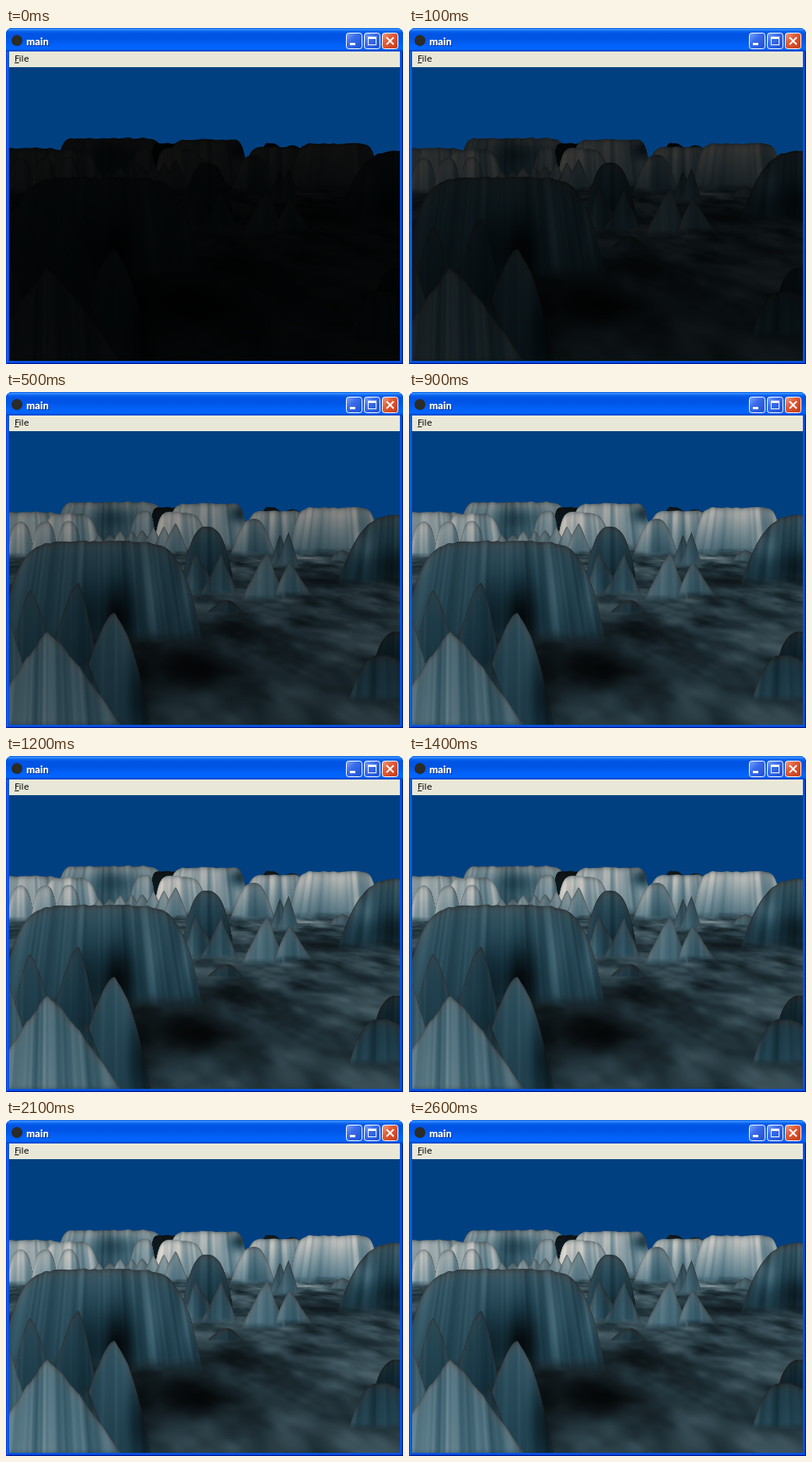
An HTML page with a canvas that plays this animation: 508 by 429 pixels, repeating every 3.6 s.

```html
<!DOCTYPE html>
<html lang="en">
<head>
<meta charset="utf-8">
<title>main</title>
<style>
html, body { margin: 0; width: 100%; height: 100%; overflow: hidden; background: #fff; }
.window { position: absolute; left: 0; top: 0; width: 508px; height: 429px; overflow: hidden;
  border-radius: 8px 8px 0 0; background: #0855dd;
  box-shadow: inset 1px 0 #0831d9, inset -1px -1px #00138c, inset 2px 0 #166aee, inset -2px -2px #0441d8; }
.bar { position: absolute; inset: 0 0 auto; height: 30px;
  background: linear-gradient(#0a5be0, #3a93ff 6%, #0a63f0 14%, #0054e3 25%, #0055e5 45%, #0262fb 75%, #0366ff 88%, #0254e0 94%, #0040c8); }
.icon { position: absolute; left: 7px; top: 9px; width: 14px; height: 14px; border-radius: 50%; background: #2b2b28; }
.title { position: absolute; left: 26px; top: 8px; font: 900 13px/18px Lato, "Open Sans", sans-serif;
  color: #fff; text-shadow: 1px 1px #0a2a8a; }
.btn { position: absolute; top: 6px; width: 21px; height: 21px; }
.menu { position: absolute; left: 4px; top: 30px; width: 500px; height: 20px; background: #e9e8d8; }
.menu span { position: absolute; left: 7px; top: 2px; font: 11px/15px "DejaVu Sans", sans-serif; color: #000; }
.view { position: absolute; left: 4px; top: 50px; width: 500px; height: 375px; background: #004080; }
canvas { position: absolute; left: 0; top: 0; filter: brightness(.08); }
</style>
</head>
<body>
<div class="window">
  <div class="bar">
    <div class="icon"></div>
    <div class="title">main</div>
    <svg width="0" height="0">
      <linearGradient id="blue" x2="1" y2="1">
        <stop stop-color="#7ea6f7"/><stop offset=".4" stop-color="#3a6cea"/><stop offset="1" stop-color="#1c4fd2"/>
      </linearGradient>
      <linearGradient id="red" x2="1" y2="1">
        <stop stop-color="#f0a48e"/><stop offset=".4" stop-color="#e05a36"/><stop offset="1" stop-color="#c23a14"/>
      </linearGradient>
    </svg>
    <svg class="btn" style="left:435px"><rect x=".5" y=".5" width="20" height="20" rx="3" fill="url(#blue)" stroke="#fff"/><path d="M5 13h7v3H5z" fill="#fff"/></svg>
    <svg class="btn" style="left:458px"><rect x=".5" y=".5" width="20" height="20" rx="3" fill="url(#blue)" stroke="#fff"/><path d="M5 5h11v11H5zM6 8v7h9V8z" fill="#fff" fill-rule="evenodd"/></svg>
    <svg class="btn" style="left:481px"><rect x=".5" y=".5" width="20" height="20" rx="3" fill="url(#red)" stroke="#fff"/><path d="M6 6l9 9M15 6l-9 9" stroke="#fff" stroke-width="2.2"/></svg>
  </div>
  <div class="menu"><span><u>F</u>ile</span></div>
  <div class="view"><canvas id="land" width="500" height="375"></canvas></div>
</div>
<script>
const land = document.getElementById('land');
const W = 500, H = 375, LEFT = 4, TOP = 50;

const clamp = v => Math.max(0, Math.min(1, v));
const mix = (a, b, t) => a + (b - a) * t;
const ease = t => t * t * (3 - 2 * t);

// Smooth value noise
const hash = (x, y) => {
  const s = Math.sin(x * 127.1 + y * 311.7) * 43758.5453;
  return s - Math.floor(s);
};
function noise(x, y) {
  const i = Math.floor(x), j = Math.floor(y), u = ease(x - i), v = ease(y - j);
  return mix(mix(hash(i, j), hash(i + 1, j), u), mix(hash(i, j + 1), hash(i + 1, j + 1), u), v);
}
const fbm = (x, y) => noise(x, y) * .55 + noise(x * 2 + 7, y * 2) * .28 + noise(x * 4, y * 4 + 3) * .17;

// The scene is kept as light, greyness and coverage; colour comes last
const light = new Float32Array(W * H), grey = new Float32Array(W * H), cover = new Float32Array(W * H);

function blend(x, y, l, g, a) {
  const k = (y - TOP) * W + x - LEFT, c = cover[k] + (1 - cover[k]) * a;
  const t = c ? a / c : 0;
  light[k] = mix(light[k], l, t);
  grey[k] = mix(grey[k], g, t);
  cover[k] = c;
}

function each(x0, y0, x1, y1, draw) {
  const right = Math.min(LEFT + W, Math.ceil(x1)), low = Math.min(TOP + H, Math.ceil(y1));
  for (let x = Math.max(LEFT, Math.floor(x0)); x < right; x++)
    for (let y = Math.max(TOP, Math.floor(y0)); y < low; y++) draw(x, y);
}

// Soft lighter (k > 0) or darker (k < 0) spot
function spot(cx, cy, rx, ry, k) {
  each(cx - 3 * rx, cy - 3 * ry, cx + 3 * rx, cy + 3 * ry, (x, y) => {
    light[(y - TOP) * W + x - LEFT] *= 1 + k * Math.exp(-(((x - cx) / rx) ** 2) - ((y - cy) / ry) ** 2);
  });
}

// Landform: power 1 is a cone, 2-3 a hill, 6 and up a mesa; l0 and l1 light its top and foot
function form(cx, top, left, right, base, power, l0, l1) {
  const high = base - top, wild = power < 2 ? 4 : 2;
  each(cx - left, top - 3, cx + right, base, (x, y) => {
    const d = (x - cx) / (x < cx ? left : right), fall = Math.abs(d) ** power;
    const rough = (noise(x * .16, cx) - .5) * wild * (1 - fall);
    const depth = y - (top + high * fall + rough);
    if (depth < -.5) return;
    const t = clamp((y - top) / high), u = cx + (x - cx) / (.8 + .2 * t);
    const flute = noise(u * .1, cx) * .6 + noise(u * .27, cx + 9) * .4 - .5;
    const l = mix(l0, l1, t) * (1 + flute * .5 - d * .12) * (1 - .35 * Math.exp(-depth / 3));
    blend(x, y, l, .7 * Math.exp(-depth / 7), clamp(depth + .5) * clamp((base - y) / (high * .16)));
  });
}

function valley() {
  each(LEFT, 182, LEFT + W, TOP + H, (x, y) => {
    const z = 900 / (y - 130);
    const v = clamp((fbm((x - 254) * z * .0045 + 20, z * 1.8 + x * .003) - .5) * 1.3 + .5);
    blend(x, y, 28 + 82 * v, .35, 1);
  });
  spot(225, 350, 85, 48, -.85);
  spot(285, 300, 55, 16, -.4);
  spot(410, 242, 75, 11, -.6);
  spot(385, 211, 55, 6, .5);
}

function far() {
  form(132, 140, 70, 76, 198, 12, 160, 80);
  spot(138, 160, 28, 16, -.4);
  form(205, 147, 22, 22, 190, 9, 22, 30);
  form(257, 142, 52, 53, 202, 11, 185, 150);
  spot(298, 155, 13, 12, -.6);
  form(215, 153, 27, 45, 204, 5, 185, 145);
  form(336, 146, 12, 24, 162, 2, 32, 32);
  form(366, 149, 16, 18, 162, 2, 40, 40);
  form(345, 151, 45, 52, 209, 6, 180, 110);
  form(425, 147, 62, 52, 208, 10, 190, 110);
  form(316, 161, 30, 28, 210, 2.2, 165, 110);
  form(178, 152, 22, 14, 200, 4, 150, 120);
  form(25, 153, 45, 55, 205, 10, 180, 165);
  form(80, 155, 40, 42, 205, 5, 180, 165);
  for (let i = 0; i < 3; i++) form(18 + i * 31, 165, 18, 18, 212, 3, 178, 140);
  for (let i = 0; i < 8; i++) form(118 + i * 14, 181 - i * 2 + hash(i, 4) * 4, 17, 17, 208, 1.3, 150, 115);
}

function middle() {
  form(430, 199, 18, 16, 216, 1.3, 105, 95);
  form(506, 156, 83, 20, 248, 3, 88, 55);
  spot(458, 198, 14, 18, .4);
  spot(494, 222, 22, 22, -.5);
  form(257, 172, 33, 34, 244, 2.8, 88, 50);
  form(242, 203, 18, 32, 260, 1, 72, 75);
  form(275, 206, 28, 22, 260, 1, 78, 85);
  form(350, 184, 14, 17, 224, 1.2, 85, 100);
  form(361, 180, 17, 14, 224, 1.1, 90, 105);
  form(333, 203, 35, 27, 268, 1, 112, 105);
  form(362, 214, 21, 30, 261, 1, 108, 95);
  form(283, 266, 26, 20, 282, 2, 65, 60);
  form(506, 305, 38, 10, 356, 3.5, 48, 28);
  form(478, 336, 40, 60, 395, 2.5, 58, 70);
}

function near() {
  form(120, 190, 130, 131, 322, 6, 92, 70);
  spot(142, 288, 24, 48, -.85);
  spot(104, 290, 15, 48, -.45);
  spot(188, 262, 14, 55, .25);
  spot(230, 262, 11, 45, .4);
  form(30, 252, 28, 36, 365, 1.4, 78, 62);
  form(91, 244, 40, 28, 365, 1.5, 70, 50);
  form(2, 285, 30, 36, 400, 1, 95, 105);
  form(138, 283, 60, 52, 450, 1.6, 84, 62);
  spot(172, 385, 18, 50, -.5);
  form(101, 336, 8, 22, 395, 1.1, 55, 75);
  form(53, 306, 90, 104, 440, 1.15, 110, 122);
}

// Dark ice is blue, bright ice is warm white
function paint() {
  const ctx = land.getContext('2d'), img = ctx.createImageData(W, H), d = img.data;
  for (let k = 0; k < W * H; k++) {
    const l = light[k], s = clamp(1.35 - l / 150) * (1 - grey[k]);
    d[k * 4] = l * (1.02 - .62 * s);
    d[k * 4 + 1] = l * (1 - .08 * s);
    d[k * 4 + 2] = l * (.97 + .18 * s);
    d[k * 4 + 3] = cover[k] * 255;
  }
  ctx.putImageData(img, 0, 0);
}

valley();
far();
middle();
near();
paint();

// Light rises in 100 ms steps, then holds
const start = performance.now();
function tick(now) {
  const t = Math.max(0, now - start) % 3600;
  const n = Math.min(26, Math.floor(t / 100));
  land.style.filter = `brightness(${(1 - .92 * Math.exp(-.22 * n)).toFixed(4)})`;
  requestAnimationFrame(tick);
}
requestAnimationFrame(tick);
</script>
</body>
</html>
```
